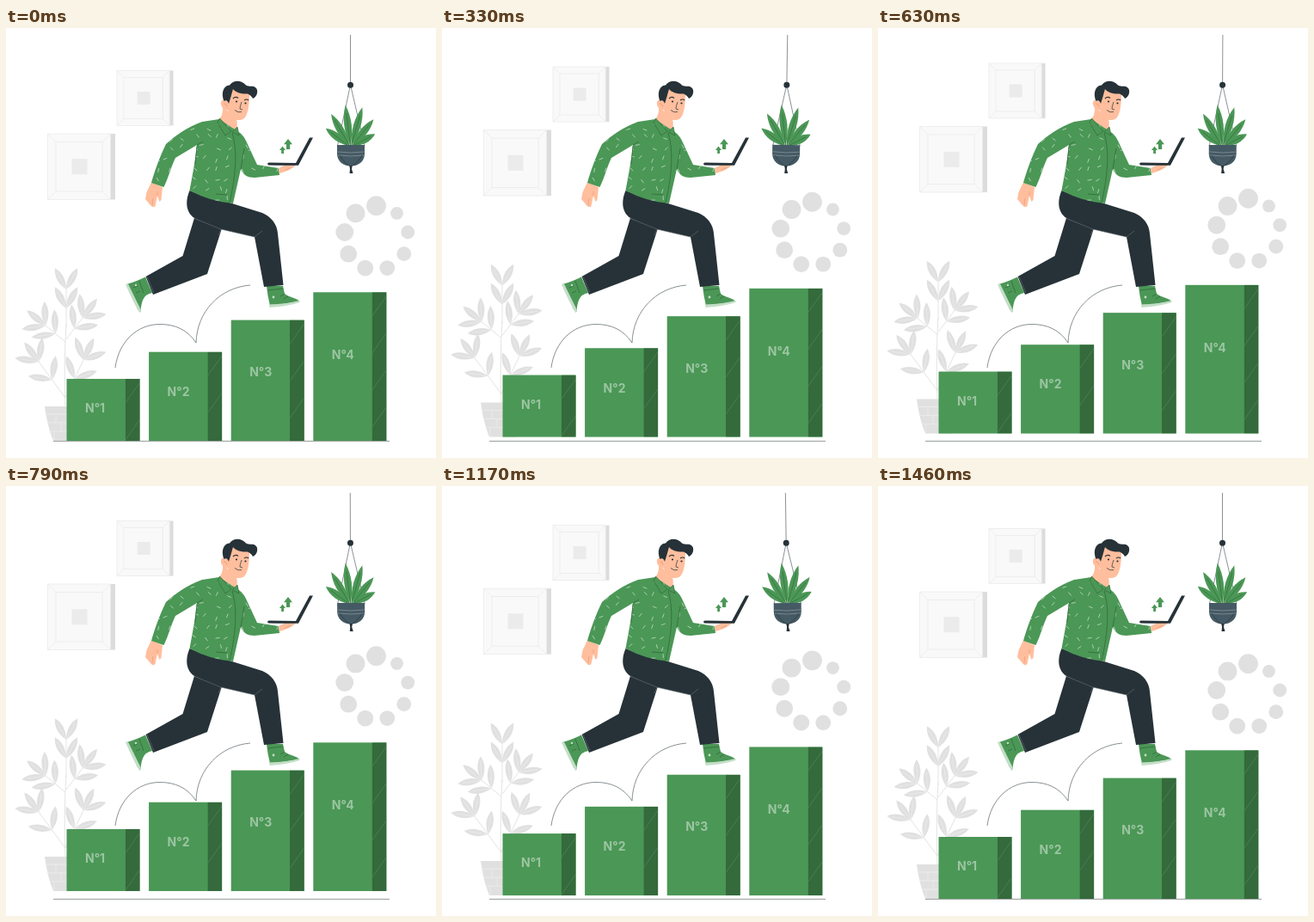
An HTML page with a canvas that plays this animation: 500x500 px, repeating every 1500 ms.

```html
<!DOCTYPE html>
<html lang="en">
<head>
<meta charset="utf-8">
<style>
  html, body { margin: 0; width: 100%; height: 100%; overflow: hidden; background: #fff; }
  canvas { display: block; width: 500px; height: 500px; }
</style>
</head>
<body>
<canvas id="stage"></canvas>
<script>
const LOOP = 1500, CYCLE = 1460, FLOOR = 480;
const GREEN = '#4b9756', DEEP = '#346a3c', DARK = '#263238', SKIN = '#ffbe9d',
      BLUSH = '#eb9b78', GREY = '#e0e0e0', PALE = '#c3dec7';
const canvas = document.getElementById('stage');
const ctx = canvas.getContext('2d');
const ratio = window.devicePixelRatio || 1;
canvas.width = canvas.height = 500 * ratio;

const radians = degrees => degrees * Math.PI / 180;

function fill(d, color) {
  ctx.fillStyle = color;
  ctx.fill(new Path2D(d));
}

function stroke(d, color, width = 1) {
  ctx.strokeStyle = color;
  ctx.lineWidth = width;
  ctx.stroke(new Path2D(d));
}

function rect(x, y, w, h, color) {
  ctx.fillStyle = color;
  ctx.fillRect(x, y, w, h);
}

function dot(x, y, r, color) {
  ctx.fillStyle = color;
  ctx.beginPath();
  ctx.arc(x, y, r, 0, Math.PI * 2);
  ctx.fill();
}

// A pointed leaf growing from (x, y); angle 0 points up.
function leaf(x, y, angle, length, width, color, vein) {
  ctx.save();
  ctx.translate(x, y);
  ctx.rotate(radians(angle));
  fill(`M0 0Q${width} ${-length * .55} 0 ${-length}Q${-width} ${-length * .55} 0 0Z`, color);
  stroke(`M0 0V${-length * .8}`, vein, .6);
  ctx.restore();
}

function pictureFrame(x, y, w, h, side, inset, core) {
  const r = x + w, b = y + h, i = inset;
  rect(r, y, side, h, '#dcdcdc');
  rect(x, y, w, h, '#f9f9f9');
  stroke(`M${x} ${y}H${r}V${b}H${x}Z
    M${x + i} ${y + i}H${r - i}V${b - i}H${x + i}Z
    M${x} ${y}l${i} ${i}M${r} ${y}l${-i} ${i}M${x} ${b}l${i} ${-i}M${r} ${b}l${-i} ${-i}`, '#e9e9e9', .7);
  rect(x + (w - core) / 2 + .5, y + (h - core) / 2, core, core, '#ebebeb');
}

function circleRing() {
  for (let i = 1; i <= 9; i++) {
    const a = radians(i * 40 - 90);
    dot(430.5 + 37.3 * Math.cos(a), 244 + 37.3 * Math.sin(a), 6.9 + i * .5, GREY);
  }
}

// A twig with a pair of leaves halfway, a pair at its end and an optional tip leaf.
function twig(x1, y1, x2, y2, spread, hasTip) {
  const angle = Math.atan2(x2 - x1, y1 - y2) * 180 / Math.PI;
  stroke(`M${x1} ${y1}L${x2} ${y2}`, GREY, .9);
  for (const t of [.5, 1]) {
    for (const side of [-spread, spread]) {
      leaf(x1 + (x2 - x1) * t, y1 + (y2 - y1) * t, angle + side, 28, 8, GREY, '#eee');
    }
  }
  if (hasTip) leaf(x2, y2, angle, 28, 8, GREY, '#eee');
}

function floorPlant() {
  stroke('M70 345Q67 390 69 442', GREY, .9);
  twig(70, 348, 70, 304, 28, false);
  twig(69, 365, 46, 346, 48, true);
  twig(70, 362, 89, 337, 44, true);
  twig(69, 430, 38, 388, 45, true);
  twig(69, 430, 90, 386, 45, true);
  fill('M45 440H94L85 480H55Q48 463 45 440Z', GREY);
  stroke('M47 449H72M49 459H72M52 469H72M58 449V459M64 459V469M56 469V479', '#eee', .8);
}

function bar(height, index) {
  const x = 70.5 + 95.6 * index, edge = x + 68.3, width = 85, top = FLOOR - height;
  rect(x, top, width, height, GREEN);
  ctx.save();
  ctx.beginPath();
  ctx.rect(edge, top, x + width - edge, height);
  ctx.clip();
  rect(edge, top, width, height, DEEP);
  for (let y = top + 28; y < FLOOR + 10; y += 43) {
    stroke(`M${edge} ${y}l17 -24`, '#568c5e', .6);
  }
  ctx.restore();
  ctx.fillStyle = 'rgba(255,255,255,.45)';
  ctx.font = '700 14px Inter, "Open Sans", sans-serif';
  ctx.fillText('N°' + (index + 1), x + 21.5, FLOOR + 11.5 - height * .615);
}

function hangingPlant(angle) {
  ctx.save();
  ctx.translate(402, 88.5);
  ctx.rotate(radians(angle));
  ctx.translate(-402, -88.5);
  stroke('M400.5 8V66M400.5 66L385.5 137M400.5 66L417 137', '#59636a', .7);
  dot(400.5, 66.3, 3.5, DARK);
  for (let i = -2; i <= 3; i++) {
    const lean = i * 23 - 7;
    leaf(400.5 + i, 137, lean, 28 + 20 * Math.cos(radians(lean * 1.4)), 8.5, GREEN, DEEP);
  }
  fill('M385 136H417V146C417 156 409 160.5 401 160.5C392 160.5 385 155 385 146Z', '#455a64');
  stroke('M385.5 144Q401 146 416.5 144M386 148Q401 150 416 148', '#8d9ba2', .7);
  stroke('M388 148Q394 158 401 161Q410 156 414 148', DARK, .6);
  fill('M399.3 160H402.7L402 164L403.5 169H399.5L400 164Z', DARK);
  ctx.restore();
}

const SHIRT = `M248 106L228 109C211 115 197 125 186 135C179 149 173 166 169 180L183.5 185
  C189 174 192 161 197 151L222 136C220 156 216 175 213.5 189Q238 202 264 204L273 164
  C276 171 281 174 289 174L318 171L317 163L292 159L279 131Q275 122 263 116Z`;

function shirtPattern() {
  let seed = 17;
  const random = () => (seed = seed * 16807 % 2147483647) / 2147483647;
  ctx.save();
  ctx.clip(new Path2D(SHIRT));
  for (let y = 111; y < 205; y += 12) {
    for (let x = 173; x < 318; x += 14) {
      const angle = random() * Math.PI, dx = Math.cos(angle) * 5, dy = Math.sin(angle) * 5;
      stroke(`M${x + random() * 8} ${y + random() * 7}l${dx} ${dy}`, PALE, .8);
    }
  }
  ctx.restore();
}

function shoes() {
  fill('M140 298C148 296 155 293 162 289.5L170 308C162 310 158 313 156.5 330L153 327Z', GREEN);
  fill('M139 298L142 297.5Q150 314 157 328L155.5 331.5Q147 317 139 298Z', PALE);
  stroke('M155 294L160 308M148 302L153 300M151 308L156 306', DEEP, .8);
  dot(151, 299, 1.2, PALE);

  fill('M303 300H322L324 309C328 313 339 314 341.5 318L307 323Q304 311 303 300Z', GREEN);
  fill('M306 321.5Q326 321 341 317L341.5 319Q326 324 306.5 325Z', PALE);
  stroke('M304 305L322 303M319 312L324 309M323 315L328 312', DEEP, .8);
  dot(311, 313, 1.4, PALE);
}

function head() {
  fill('M252 91Q253 100 248 106Q254 119 267 121Q270 114 268 106Z', SKIN);
  fill('M258 74C256 86 257 95 260 101C264 107 272 109 277 105C281 101 283 91 283 76L270 68Z', SKIN);
  fill('M259 86C253 81 249 84 250 89C251 94 256 96 260 95Z', SKIN);
  fill(`M253.5 85C250 77 252 67 260 66.5C264 60 274 60 279 66.5C283 69 287 66 291 70
    C294 74 291 81 287 82C286 80 284 78 281 76.5C274 77 267 75 264 71C262 78 261 82 259 88
    C258 85 256 83 253.5 85Z`, DARK);
  stroke('M264 82Q267 79 270 81.5M277 84Q280 82 282 84', DARK, 1.1);
  dot(268, 85.5, 1.1, DARK);
  dot(278.5, 87.5, 1.1, DARK);
  stroke('M274 86Q272 91 272 94L275 95M266 95.5Q270 99 274 97.5', DARK, .7);
  stroke('M253 88Q256 87 257 92', BLUSH, .8);
}

function laptop() {
  fill('M317 163L325 159H337Q333 165 318 169Z', SKIN);
  stroke('M324 165L331 162.5', BLUSH, .7);
  fill('M304 158Q304 156.5 306 156.5L337 157L353 127.5H357L340 159.7Q323 160 305 159.5Z', DARK);
  fill('M328 129L333 135.3H330.2V141H326V135.3H323Z', GREEN);
  fill('M321.5 137.5L325 142H323V146H320.2V142H318Z', GREEN);
}

function runner() {
  shoes();
  fill('M219 221L205.5 265L162.5 289L171 310L234 286L251 233Z', DARK);
  fill(`M213.5 189C208 202 209 216 221 222L250 234L289 243L300 301L322.5 299L316 239
    C315 228 309 220 298 215L250 200Q230 196 213.5 189Z`, DARK);
  stroke('M218 221L250 234L289 243L298 236M250 234L247 241M164 289L172 308', '#69747a', .6);
  fill('M169 179.5L182 185L180.5 200L178.5 202L176 195L173.5 207Q171 210 168 206L162 199L163.5 191Z', SKIN);
  stroke('M171 198L170 206M176 195L176 190', BLUSH, .7);
  head();
  fill(SHIRT, GREEN);
  shirtPattern();
  stroke('M222 136L229 132M222 137L220 158M273 164L277 140M263 122Q272 151 260 203M244 193L257 194', DEEP, .8);
  const collar = 'M248.5 105L262 120L255 125L246 110ZM269 115L271 125L263 121Z';
  fill(collar, GREEN);
  stroke(collar, DEEP, .7);
  laptop();
}

function draw(time) {
  const p = Math.min(time / CYCLE, 1);
  const lift = -9.8 * (1 - Math.abs(1 - 2 * p));
  const sway = p < .25 ? p * 4 : p < .75 ? 2 - p * 4 : p * 4 - 4;

  ctx.setTransform(ratio, 0, 0, ratio, 0, 0);
  rect(0, 0, 500, 500, '#fff');
  stroke('M55 480.4H446', '#68716f', .7);

  ctx.save();
  ctx.translate(0, lift);
  pictureFrame(48.5, 123, 73, 76.5, 5.5, 9.5, 18);
  pictureFrame(129, 49.5, 61.3, 64, 4.2, 8, 15);
  circleRing();
  floorPlant();
  [72, 103.3, 140.4, 172.7].forEach(bar);
  ctx.restore();

  hangingPlant(sway);
  stroke('M127 395C131 365 152 344.5 179 344.5C197 344.5 211 351 221 366C222 330 248 302 284 299', '#566066', .7);
  runner();
}

function tick(now) {
  draw(now % LOOP);
  requestAnimationFrame(tick);
}
tick(0);
</script>
</body>
</html>
```
